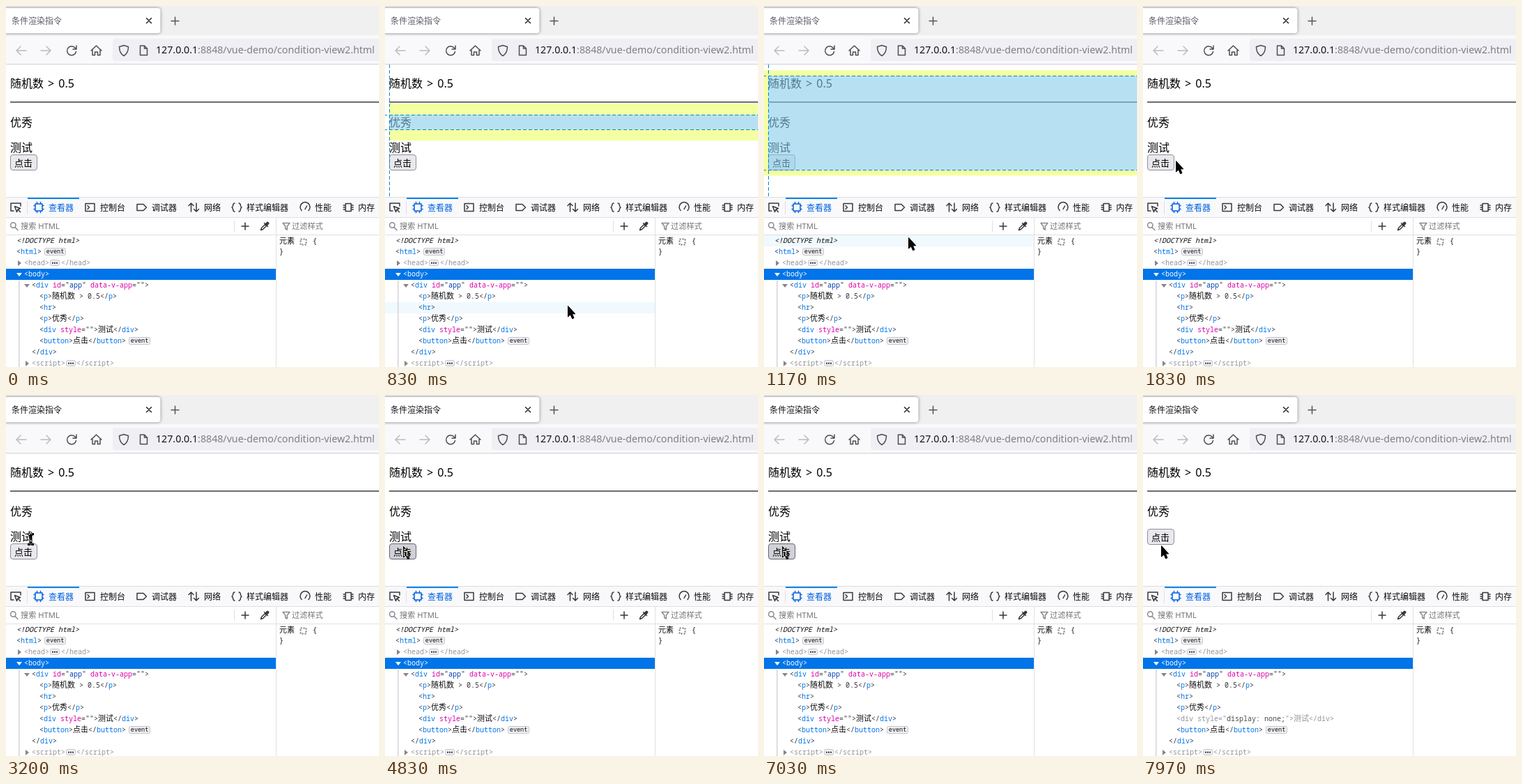
These frames come from a looping animation (535 by 518 pixels, 8 s). An HTML page:

```html
<!DOCTYPE html>
<html lang="zh-CN">
<head>
<meta charset="utf-8">
<title>条件渲染指令</title>
<style>
  html, body { margin: 0; width: 535px; height: 518px; overflow: hidden; background: #fff; }
  svg { display: block; }
  text { font: 12px 'Noto Sans', 'Noto Sans CJK SC', 'Noto Sans CJK', sans-serif; fill: #0c0c0d; white-space: pre; }
  .page text { font-size: 16px; fill: #000; }
  .page .label { font-size: 13px; }
  .url { font-size: 14.2px; fill: #15141a; }
  .soft { fill: #7e7e85; }
  .hint { font-size: 11.2px; fill: #737378; }
  .code { font: 10px 'Noto Sans Mono', 'Noto Sans CJK SC', 'Noto Sans CJK', monospace; }
  .punct { fill: #38383d; }
  .tag { fill: #0074e8; }
  .attr { fill: #dd00a9; }
  .value { fill: #003eaa; }
  .cjk { font-size: 11px; fill: #0c0c0d; }
  .dim tspan { fill: #939398; }
  .dim .value { fill: #4a4a4f; }
  .picked tspan { fill: #fff; }
  .badge { font-size: 8.5px; }
  .icon { fill: none; stroke: #38383d; stroke-width: 1.5; stroke-linecap: round; stroke-linejoin: round; }
</style>
</head>
<body>
<script>
const W = 535, H = 518, LOOP = 8000, PANE = 387;
const esc = s => s.replace(/</g, '&lt;');
const rect = (x, y, w, h, fill, more = '') =>
  `<rect x="${x}" y="${y}" width="${w}" height="${h}" fill="${fill}" ${more}/>`;
const text = (x, y, s, cls = '', more = '') =>
  `<text x="${x}" y="${y}" class="${cls}" ${more}>${esc(s)}</text>`;
const icon = (d, color = '#38383d', more = '') =>
  `<path class="icon" d="${d}" style="stroke:${color}" ${more}/>`;
const span = (cls, s) => `<tspan class="${cls}">${esc(s)}</tspan>`;

// Colours one line of markup.
const highlight = src => src.replace(
  /(<\/?)(\w+)|([\w-]+)="([^"]*)"|([\u4e00-\u9fff]+)|[^<\u4e00-\u9fff]/g,
  (m, open, tag, attr, value, cjk) =>
    tag ? span('punct', open) + span('tag', tag)
    : attr ? span('attr', attr) + span('punct', '="') + span('value', value) + span('punct', '"')
    : span(cjk ? 'cjk' : 'punct', m));
const code = (x, mid, src, cls = '', id = '') =>
  `<text id="${id}" x="${x}" y="${mid + 4}" class="code ${cls}">${highlight(src)}</text>`;

const box = (x, y, w, h) => rect(x + .5, y + .5, w - 1, h - 1, '#f0f0f4', 'rx="2" stroke="#c4c4cb"');
const eventBadge = (x, mid) => box(x, mid - 5, 31, 11) + text(x + 2.8, mid + 3.3, 'event', 'code badge');
const dots = (x, mid) => box(x, mid - 4, 14, 9) +
  [4, 7, 10].map(d => rect(x + d - 1, mid - .3, 2, 2, '#38383d')).join('');
const arrowDown = (x, y, c) => `<path d="M${x - 4} ${y - 2}h8l-4 5z" fill="${c}"/>`;
const arrowRight = (x, y, c) => `<path d="M${x - 2} ${y - 4}v8l5 -4z" fill="${c}"/>`;

const chrome = () =>
  rect(0, 0, W, 84, '#f0f0f0') + rect(0, 42, W, 42, '#f9f9fb') +
  rect(-6, 3, 227.5, 36, '#fff', 'rx="4" style="filter:drop-shadow(0 0 2px #0007)"') +
  text(8, 26, '条件渲染指令', '', 'id="title"') +
  icon('M201.5 17.5l7 7m0 -7l-7 7', '#28282d', 'stroke-width="1.2"') +
  icon('M237 21.5h11m-5.5 -5.5v11', '#55555c') +
  icon('M29 64H15m6 -6l-6 6l6 6M50 64h14m-6 -6l6 6l-6 6', '#bcbcc0') +
  icon('M99.5 60.5a6.5 6.5 0 1 0 1 5M101 57v5h-5', '#4c4c52') +
  icon('M122 64l7.500 -7l7.500 7M124 63v7.500h3.500v-4.500h4v4.500h3.500v-7.500', '#4c4c52') +
  rect(153, 47, 400, 32, '#f0f0f4', 'rx="4"') +
  icon('M169 56.500l6.500 2c0 6 -1.500 10 -6.500 13c-5 -3 -6.500 -7 -6.500 -13z', '#4c4c52') +
  icon('M192.500 57h6l4 4v9.500h-10zM198.500 57v4h4', '#4c4c52') +
  `<text class="url" x="215" y="68">127.0.0.1<tspan class="soft">:8848/vue-demo/condition-view2.html</tspan></text>` +
  rect(0, 83, W, 1, '#d0d0d4');

const page = () => `<g class="page">` +
  text(6, 117, '随机数') + text(60, 117, '>') + text(75.3, 117, '0.5') +
  rect(6, 137, W, 1, '#555') + rect(6, 138, W, 1, '#858585') +
  text(6, 172.500, '优秀') + text(6, 209, '测试', '', 'id="note"') +
  `<g id="button">` + rect(6.5, 213.5, 38, 22, '#e9e9ed', 'id="face" rx="3.5" stroke="#8f8f9d"') +
  text(12, 230, '点击', 'label') + `</g></g><g id="overlay"></g>`;

const toolTabs = [
  [135, '控制台', 'M114 283.500h13v11h-13zM117 286.500l2.500 2.500l-2.500 2.500'],
  [209, '调试器', 'M188 284.500h9l4.500 4.500l-4.500 4.500h-9z'],
  [284, '网络', 'M265.500 295v-12m-3.500 3.500l3.500 -3.500l3.500 3.500M273 283v12m-3.500 -3.500l3.500 3.500l3.500 -3.500'],
  [345, '样式编辑器', 'M328 283c-4 0 -1 5 -4 6c3 1 0 6 4 6M334 283c4 0 1 5 4 6c-3 1 0 6 -4 6'],
  [443, '性能', 'M424 293.500a7 7 0 1 1 10 0M429 291.500l2.500 -4.500'],
  [505, '内存', 'M487 283.500h8v11h-8zM484 286h2m-2 3h2m-2 3h2M496 286h2m-2 3h2m-2 3h2'],
];

const toolbar = () =>
  rect(0, 274, W, 244, '#fff') + rect(0, 274, W, 30, '#f9f9fb') +
  rect(0, 274, W, 1, '#dcdce0') + rect(0, 303, W, 1, '#e0e0e2') +
  rect(31, 275, 74, 2, '#0a84e8') + rect(30, 280, 1, 19, '#e0e0e2') +
  icon('M11 294h-4v-11h14v4M12.500 287.500l8 3l-3.500 1.500l-1.500 3.500zM17.500 292.500l3 3') +
  icon('M42 284h10v10h-10zM44.500 284v-2.500M49.500 284v-2.500M44.500 294v2.500M49.500 294v2.500M42 286.500h-2M42 291.500h-2M52 286.500h2M52 291.500h2', '#0060df') +
  text(61, 293.5, '查看器', '', 'style="fill:#0060df"') +
  toolTabs.map(([x, s, d]) => icon(d) + text(x, 293.5, s)).join('') +
  rect(0, 328, W, 1, '#e0e0e2') + rect(327, 308, 1, 16, '#e0e0e2') +
  icon('M14 314.500a3.700 3.700 0 1 0 -7.400 0a3.700 3.700 0 1 0 7.400 0M13 317.500l4 4', '#8a8a90') +
  text(21, 320, '搜索 HTML', 'hint') +
  icon('M338 316h10m-5 -5v10') +
  icon('M365.500 321.500l1 -3l5 -5l2 2l-5 5zM370.500 311.500l5 5') +
  `<path d="M371.500 312.500l3 -3q3 0 3 3l-3 3z" fill="#38383d"/>` +
  icon('M397 311.500h10l-3.700 4.500v5l-2.600 -1.500v-3.500z', '#8a8a90', 'stroke-width="1.2"') +
  text(410, 320, '过滤样式', 'hint');

const tree = () =>
  rect(0, 0, PANE, 16, '#f0f9fe', 'id="hover"') + rect(0, 377, PANE, 16, '#0074e8') +
  rect(18, 394, 1.5, 124, '#d4d4d8') +
  text(15, 340, '<!DOCTYPE html>', 'code', 'style="font-style:italic"') +
  code(15, 352, '<html>') + eventBadge(55, 352) +
  arrowRight(19, 369, '#85858a') + code(26, 368, '<head>', 'dim') + dots(63, 368) + code(79, 368, '</head>', 'dim') +
  arrowDown(19, 385, '#fff') + code(26, 384, '<body>', 'picked') +
  arrowDown(30, 401, '#85858a') + code(37, 400, '<div id="app" data-v-app="">') +
  code(48, 416, '<p>随机数 > 0.5</p>') + code(48, 432, '<hr>') + code(48, 448, '<p>优秀</p>') +
  rect(120, 458, 84, 13, '#ffee98', 'id="flash"') +
  code(48, 464, '<div style="">测试</div>', '', 'styleRow') +
  code(48, 480, '<button>点击</button>') + eventBadge(176, 480) +
  code(37, 496, '</div>') +
  arrowRight(30, 513, '#85858a') + code(37, 512, '<script>', 'dim') + dots(86, 512) + code(101, 512, '<\/script>', 'dim') +
  rect(PANE, 304, 1, 214, '#e0e0e2') +
  `<text class="code cjk" x="392" y="341">元素</text>` +
  rect(422.500, 334.500, 8, 8, 'none', 'stroke="#75757a" stroke-width="2" stroke-dasharray="2 2"') +
  text(440, 341, '{', 'code') + text(392, 356, '}', 'code');

// Pointers invert what lies beneath and have a black edge.
const pointer = (id, d) =>
  `<path id="${id}" d="${d}" fill="#fff" style="mix-blend-mode:difference"/>` +
  `<path id="${id}Edge" d="${d}" fill="none" stroke="#000"/>`;
const ARROW = 'M.5 .5V16L4 12.800L6.600 18.700L9 17.700L6.500 11.800H10.800Z';
const BEAM = 'M-3.5 -8.5H-1L.5 -7.500L2 -8.5H4.5V-6H2V6H4.5V8.5H2L.5 7.500L-1 8.5H-3.5V6H-1V-6H-3.5Z';

document.body.insertAdjacentHTML('beforeend',
  `<svg width="${W}" height="${H}" viewBox="0 0 ${W} ${H}" style="isolation:isolate">` +
  rect(0, 0, W, H, '#fff') + chrome() + page() + toolbar() + tree() +
  pointer('arrow', ARROW) + pointer('beam', BEAM) + '</svg>');

const el = Object.fromEntries([...document.querySelectorAll('[id]')].filter(n => n.id).map(n => [n.id, n]));
const show = (node, on) => node.setAttribute('visibility', on ? 'visible' : 'hidden');
const within = (t, spans) => spans.some(([a, b]) => t >= a && t < b);

const ENTER = 500, LEAVE = 1300, HIGHLIGHT_LAG = 100;
const PRESSED = [[2230, 2270], [3070, 3130], [5000, 5100], [6030, 6100], [7230, 7330]];
const HIDDEN = [[2270, 3130], [5100, 6100], [7330, LOOP]];
const FLASH = [[2270, 2770], [5100, 5600], [7330, 7830]];
const DIMMED = [[2270, 3200], [5370, 6300], [7530, LOOP]];

// time, x, y
const MOVES = [
  [440, 306, 530], [1000, 242, 389], [1100, 228, 368], [1300, 160, 266], [1830, 47, 222], [2070, 33, 221],
  [2710, 33, 221], [2930, 35, 207], [4250, 35, 207], [4370, 23, 207], [4610, 23, 207], [4830, 26, 217],
  [5370, 26, 217], [5570, 28, 206], [6780, 28, 206], [7030, 26, 217], [7969, 26, 217], [7970, 26, 216], [LOOP, 26, 216],
];
// Smooth monotone curve through the stops: it rests where two neighbours agree.
const rate = (i, c) => MOVES[i] && MOVES[i + 1]
  ? (MOVES[i + 1][c] - MOVES[i][c]) / (MOVES[i + 1][0] - MOVES[i][0]) : 0;
function slope(i, c) {
  if (i === 0) return rate(0, c);
  const a = rate(i - 1, c), b = rate(i, c);
  return a * b > 0 ? 2 * a * b / (a + b) : 0;
}
function cursorAt(t) {
  const i = Math.max(1, MOVES.findIndex(m => m[0] > t)) - 1;
  const from = MOVES[i], to = MOVES[i + 1], span = to[0] - from[0];
  const k = Math.max(0, (t - from[0]) / span), ease = k * k * (3 - 2 * k);
  return [1, 2].map(c => Math.round(from[c] + (to[c] - from[c]) * ease +
    span * k * (1 - k) * ((1 - k) * slope(i, c) - k * slope(i + 1, c))));
}

// Content box and margin of each element.
const BOXES = {
  html: [0, 84, W, 159.5, 0], body: [6, 100, W, 135.5, 8], app: [6, 100, W, 135.5, 0],
  first: [6, 100, W, 21, 16], rule: [6, 137, W, 2, 8], second: [6, 156, W, 21, 16],
  note: [6, 192, W, 21, 0], button: [6, 213, 39, 23, 0],
};
// Highlighted element per tree row; rows without a box keep the one passed before.
const ROWS = ['html', 'html', 'body', 'body', 'app', 'first', 'rule', 'second', 'note', 'button', 'app', ''];
const SELECTED = 3;
const rowAt = y => y >= 329 ? Math.floor((y - 329) / 16) : -1;

function overlay(name) {
  if (!BOXES[name]) return '';
  const [x, y, w, h, m] = BOXES[name], right = Math.min(W, x + w);
  const top = Math.max(84, y - m), bottom = y + h + m, left = name === 'body' ? 0 : x;
  const guide = d => `<path d="${d}" fill="none" stroke="#0088cc" stroke-dasharray="5 3"/>`;
  const margin = m ? `<path fill="#edff64" fill-opacity=".6" fill-rule="evenodd" d="M${left} ${top}H${right}V${bottom}H${left}ZM${x} ${y}H${right}V${y + h}H${x}Z"/>` : '';
  return margin + rect(x, y, right - x, h, '#87ceeb', 'fill-opacity=".6"') +
    guide(`M-2 ${Math.floor(y) + .5}H${W}`) + guide(`M-2 ${Math.floor(y + h) + .5}H${W}`) +
    guide(`M${x + .5} 84V274`) + (right < W ? guide(`M${right + .5} 84V274`) : '');
}

let shownRow, shownBox;
function update(t) {
  const [x, y] = cursorAt(t), visible = t >= ENTER;
  const hidden = within(t, HIDDEN), top = hidden ? 192 : 213;
  const over = visible && x >= 6 && x < 45 && y >= top && y < top + 23;
  const pressed = within(t, PRESSED);
  const onText = !hidden && y >= 192 && y < 213 && x < 40;

  el.title.style.fill = t < 2230 ? '#5b5b66' : '#15141a';
  show(el.note, !hidden);
  el.button.setAttribute('transform', `translate(0 ${hidden ? -21 : 0})`);
  el.face.setAttribute('fill', pressed ? '#b1b1b9' : over ? '#d0d0d7' : '#e9e9ed');
  el.face.setAttribute('stroke', pressed ? '#484851' : over ? '#676774' : '#8f8f9d');

  if (hidden !== shownRow) {
    shownRow = hidden;
    el.styleRow.innerHTML = highlight(`<div style="${hidden ? 'display: none;' : ''}">测试</div>`);
  }
  el.styleRow.setAttribute('class', within(t, DIMMED) ? 'code dim' : 'code');
  show(el.flash, within(t, FLASH));

  const row = visible ? rowAt(y) : -1;
  show(el.hover, row >= 0 && row !== SELECTED);
  el.hover.setAttribute('y', 329 + row * 16);
  const seen = t - HIGHLIGHT_LAG;
  const name = seen >= ENTER && t < LEAVE ? ROWS[rowAt(cursorAt(seen)[1])] || '' : '';
  if (name !== shownBox) el.overlay.innerHTML = overlay(shownBox = name);

  for (const part of [el.arrow, el.arrowEdge, el.beam, el.beamEdge]) {
    part.setAttribute('transform', `translate(${x} ${y})`);
    show(part, visible && part.id.startsWith('beam') === onText);
  }
}

const start = performance.now();
function frame() {
  update((performance.now() - start) % LOOP);
  requestAnimationFrame(frame);
}
frame();
</script>
</body>
</html>
```
